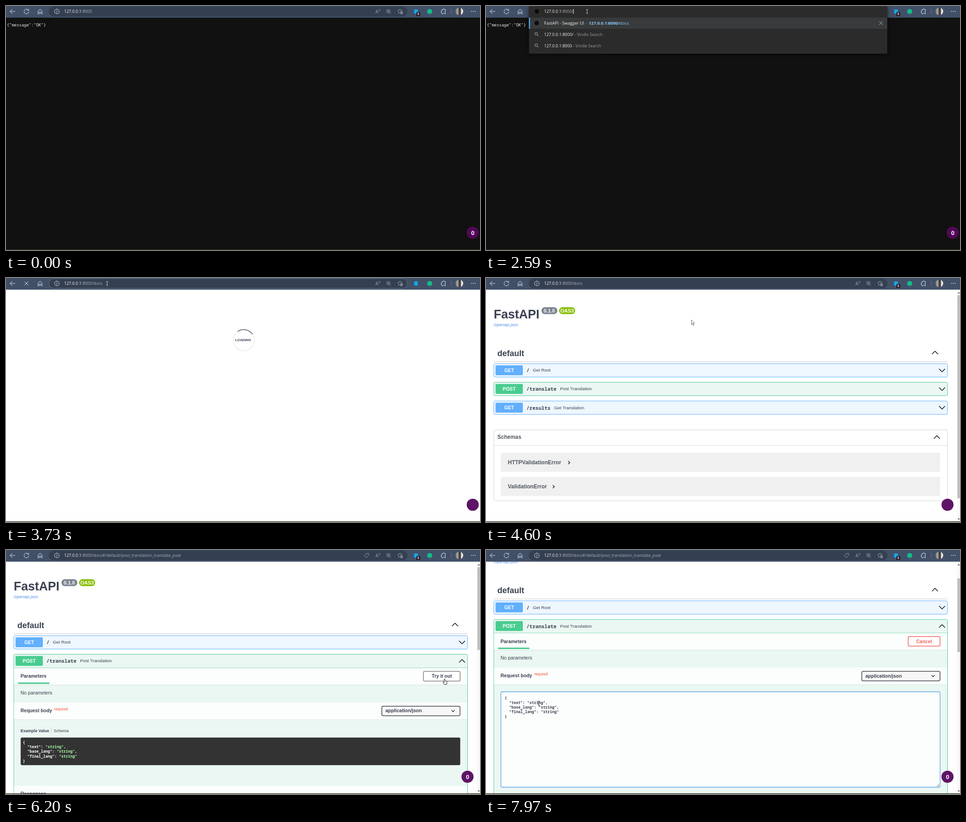
An HTML page that plays this animation: 1043 by 537 pixels, repeating every 8 s.

```html
<!DOCTYPE html>
<html lang="en">
<head>
<meta charset="utf-8">
<title>API docs walkthrough</title>
<style>
html, body { margin: 0; height: 100%; overflow: hidden; background: #111; }
svg { display: block; width: 100vw; height: 100vh; }
text { white-space: pre; }
.ui { font-family: "Open Sans", "Noto Sans", sans-serif; }
.doc { font-family: "Liberation Sans", Arial, sans-serif; }
.code { font-family: "Noto Sans Mono", "DejaVu Sans Mono", monospace; }
.b { font-weight: 700; }
.mid { text-anchor: middle; }
</style>
</head>
<body>
<svg id="stage" viewBox="0 0 1043 537"></svg>
<script>
const LOOP = 8000;
const INK = '#3b4151', GREEN = '#49cc90', BLUE = '#61affe';
const HOST = '127.0.0.1', PORT = ':8000', DOCS = '/docs';

// Moments of the story, in ms
const FOCUS = 1000, DESELECT = 1500, ENTER = 3520, BLANK = 3590, LOADER = 3660, READY = 4000,
  HOVER = 4980, OPEN = 5160, LOADED = 5640, LEAVE = 5780, TRY = 6430, SCROLL = 6800, EDIT = 7550;
const KEYS = [2590, 2860, 3060, 3120, 3320];
const CARET = [188.5, 192.3, 197.8, 203.3, 207.5, 212];

// Pointer path: time, x, y
const TRACK = [
  [170, 872, 508], [420, 660, 440], [650, 286, 236], [830, 190, 34], [920, 190, 12], [1000, 190, 12],
  [1210, 212, 11], [1400, 212, 11], [1700, 222.5, 12], [4330, 222.5, 12], [4700, 540, 130],
  [5090, 833, 246], [5700, 833, 246], [6130, 966, 290], [6450, 966, 290], [6740, 300, 440],
  [6800, 300, 440], [7220, 116.5, 338], [LOOP, 116.5, 338]
];

const rect = (x, y, w, h, fill, r = 0, more = '') =>
  `<rect x="${x}" y="${y}" width="${w}" height="${h}" rx="${r}" fill="${fill}" ${more}/>`;
const box = (x, y, w, h, fill, stroke, width = 1, r = 3) =>
  rect(x, y, w, h, fill, r, `stroke="${stroke}" stroke-width="${width}"`);
const dot = (x, y, r, fill, more = '') => `<circle cx="${x}" cy="${y}" r="${r}" fill="${fill}" ${more}/>`;
const line = (d, stroke, width = 1, more = '') =>
  `<path d="${d}" fill="none" stroke="${stroke}" stroke-width="${width}" ${more}/>`;
const text = (x, y, s, size, fill, cls = 'doc') =>
  `<text x="${x}" y="${y}" font-size="${size}" fill="${fill}" class="${cls}">${s}</text>`;
const span = (s, fill, cls = '') => `<tspan fill="${fill}" class="${cls}">${s}</tspan>`;
const at = (x, y, s, more = '') => `<g transform="translate(${x} ${y}) ${more}">${s}</g>`;
const chevron = (x, y, up) => line(up ? `M${x - 6.5} ${y + 3.5}l6.5-6.5 6.5 6.5` : `M${x - 6.5} ${y - 3}l6.5 6.5 6.5-6.5`, '#111', 1.5);

function pointer(t) {
  const i = TRACK.findIndex(k => k[0] > t);
  if (i < 1) return null;
  const [t0, x0, y0] = TRACK[i - 1], [t1, x1, y1] = TRACK[i];
  const u = (t - t0) / (t1 - t0);
  return { x: x0 + (x1 - x0) * u, y: y0 + (y1 - y0) * u };
}

function drawPointer(t, p) {
  const hand = t >= HOVER && t < LEAVE || t >= 6060 && t < 6500;
  if (hand) return at(p.x, p.y, `<path d="M-2-5.2a1.1 1.1 0 0 1 2.2 0V-1.6L3.6-.9Q4.6-.6 4.6 .6L3.8 5.8H-1.6L-4.6 1.4Q-4.4 .2-3.2 .8L-2 1.8Z" fill="#fff" stroke="#222"/>`);
  if (p.y < 24 || t > 6740)
    return at(p.x, p.y, line('M-2-4.5Q0-4.5 0-3.5Q0-4.5 2-4.5M0-3.5V3.5M-2 4.5Q0 4.5 0 3.5Q0 4.5 2 4.5', t > 6740 ? '#333' : '#d4d4d4'));
  return at(p.x, p.y, '<path d="M-3-6V4L-.8 2 1 6 2.6 5.2.8 1.4H4Z" fill="#fff" stroke="#222" stroke-width=".7"/>');
}

// Browser toolbar

function navIcons(t) {
  const c = '#e6e9ee', busy = t >= ENTER && t < READY;
  return line('M20 12H9.5M14 7l-5 5 5 5', c) +
    (busy ? line('M41 8l8 8M49 8l-8 8', c)
          : line('M49.2 9A5.2 5.2 0 1 0 50.2 12M49.8 6.3V9.4H46.7', c)) +
    line('M70.5 11.2L75 7l4.5 4.2V17H76.7V13.3H73.3V17H70.5Z', c) +
    rect(898, 7.5, 8, 9, '#10a9e8', 1) +
    (busy ? '' : rect(903, 13.5, 8.5, 8.5, '#22162c', 1.5) + text(907.3, 20.3, '0', 7, '#fff', 'doc b mid')) +
    dot(932.3, 12, 5.6, '#14b98c') +
    line('M959 8h2.2a1.7 1.7 0 0 1 3.4 0H967v3a1.7 1.7 0 0 0 0 3.2V17h-2.6a1.7 1.7 0 0 0-3.2 0H959v-2.5a1.7 1.7 0 0 1 0-3.5Z', c) +
    line('M979.5 6V18', '#68758a') +
    dot(997.5, 12, 8.5, 'url(#face)') +
    [1024.5, 1028.5, 1032.5].map(x => dot(x, 12, .9, c)).join('');
}

function pillIcons(t, focused) {
  const c = focused ? '#b9b9b9' : '#98a1ae';
  let s = text(813, 15.8, 'A', 10, c, 'ui') + line('M820 7.5q1 1.7 0 3.2M822 6.3q1.7 2.7 0 5.3', c, .8) +
    dot(841.3, 11.2, 3.7, 'none', `stroke="${c}"`) + line('M844 14l3.2 3.2M839.3 11.2h4M841.3 9.2v4', c, .9) +
    line('M867 6.5l1.5 3.3 3.6.4-2.6 2.4M866.5 15l-2.8 1.5.6-3.5-2.7-2.6 3.7-.5 1.7-3.4', c, .9) +
    dot(870.3, 15, 2.9, c) + line('M868.7 15h3.2M870.3 13.4v3.2', '#333e4d', .8);
  if (focused) s += line('M764.5 14.5V9h7.5M763 15h5.5M769.5 10.8h3.5v4.7h-3.5Z', c) +
    [[788.5, 7.5], [794, 7.5], [788.5, 13], [794, 13]].map(([x, y]) => box(x, y, 3.2, 3.2, 'none', c, 1, 0)).join('') +
    line('M790 12h6M793 9v6', c, .8);
  if (t >= OPEN) s += line('M788 12.7l5-5.2 4.8-.3.2 4.6-5.1 5.2Z', c, .9) + dot(795.6, 9.6, .6, c);
  return s;
}

function dropdown(n) {
  const rows = n < 2 ? 3 : 2, typed = HOST + PORT + DOCS.slice(0, n);
  const search = (y, s) => dot(110.5, y - 4.5, 3, 'none', 'stroke="#bbb"') + line(`M112.8 ${y - 2.2}l3 3`, '#bbb') +
    text(128, y, span(s, '#f0f0f0') + span(' - Vindle Search', '#9a9a9a'), 9, '#fff', 'ui');
  return `<g style="filter:drop-shadow(0 2px 4px #0009)">` +
    rect(94.5, 0, 788.5, rows * 25 + 30, '#2b2b2b', 3) + '</g>' + rect(94.5, 0, 788.5, 5, '#2d2d2d') +
    rect(94.5, 25.5, 788.5, 24.5, '#383a3b') + rect(94.5, 25.5, 2.3, 24.5, '#58aef2') +
    dot(111.5, 37.5, 4.8, '#0a0a0a') + text(128, 41, 'FastAPI - Swagger UI', 9.25, '#f4f4f4', 'ui') +
    text(219, 41, '-', 9, '#9a9a9a', 'ui') +
    text(226, 41, span(typed, '#8ccbff', 'b') + DOCS.slice(n), 9.4, '#8ccbff', 'ui') +
    line('M865 33.5l8 8M873 33.5l-8 8', '#b5b5b5') +
    search(65.7, typed) + (rows > 2 ? search(90.7, HOST + PORT) : '');
}

function toolbar(t, p) {
  const focused = t >= FOCUS && t < ENTER, n = KEYS.filter(k => t >= k).length, list = focused && n;
  const picked = focused && t < DESELECT, over = p && p.y < 24;
  let s = rect(0, 0, 1043, 25.7, '#425067') + navIcons(t);
  if (list) s += dropdown(n);
  else s += (focused ? box(94.8, 1.8, 788, 20.5, '#2a2b2b', '#62b3ee', 1.6, 10.2)
                     : box(94.5, 1.5, 788.5, 21, '#344052', over ? '#5c6a7e' : '#344052', 1, 10.5)) +
    pillIcons(t, focused);
  s += list ? dot(112, 12, 4.8, '#0a0a0a')
            : dot(112, 12, 5.2, 'none', 'stroke="#d5d9df"') + line('M112 11v4M112 8.7v1.2', '#d5d9df', 1.1);
  if (picked) s += rect(127.5, 4.5, 61, 15, '#a6c8f5');
  const tail = t >= OPEN ? DOCS + '#/default/post_translation_translate_post' : DOCS.slice(0, n);
  s += text(128, 15.3, span(HOST, picked ? '#1d2a3a' : '#f3f4f6') + PORT + tail, 9, picked ? '#1d2a3a' : '#a9b0ba', 'ui');
  if (focused && (t >= 1660 && t < 2190 || n)) s += rect(CARET[n] - .4, 6.5, .9, 11, '#fff');
  return s;
}

// Docs page

function row(y, verb, path, name, x, color, fill, height = 29.5) {
  return box(17.2, y, 998.3, height, fill, color, 1) + rect(21, y + 3.7, 60, 21.8, color, 2) +
    text(51, y + 18.3, verb, 10.5, '#fff', 'doc b mid') + text(89, y + 18.8, path, 11, INK, 'code b') +
    text(x, y + 17.8, name, 9.75, INK);
}

function band(y, h, title) {
  return rect(17.7, y, 997.3, h, '#fbfefc') + line(`M17.7 ${y + h}H1015`, '#d3e2db') + text(32, y + 21.3, title, 10.5, INK, 'doc b');
}

function body(x, y, step, ink, value) {
  const pair = (k, comma) => `  "${k}": ` + span('"string"', value) + comma;
  return ['{', pair('text', ','), pair('base_lang', ','), pair('final_lang', ''), '}']
    .map((s, i) => text(x, y + i * step, s, 8.3, ink, 'code b')).join('');
}

function operation(t) {
  let s = band(260, 37, 'Parameters') + rect(26.5, 291.5, 69, 3.2, GREEN) +
    text(32, 317.5, 'No parameters', 10.5, INK) + band(335.5, 38, 'Request body') +
    text(106, 353, 'required', 8.2, '#f5533d') +
    box(827, 343.7, 172, 21, '#f7f7f7', '#41444e', 1.5) + text(835, 357.3, 'application/json', 10.5, INK, 'doc b') +
    line('M980.5 352.5l3.3 3.3 3.3-3.3', '#222', 1.4);
  if (t < TRY) return s + box(918.5, 267, 80.7, 21.5, '#fff', '#808080', 1.5) +
    text(959, 281.3, 'Try it out', 10.5, INK, 'doc b mid') +
    text(32, 401.2, 'Example Value', 9, INK, 'doc b') + line('M99.7 392v12', '#c5cdca') + text(105, 401.2, 'Schema', 9, INK) +
    rect(32.3, 412.7, 967.2, 60.8, '#333', 3) + body(37, 425.5, 10.4, '#fff', '#a2fca2') + band(519, 38, 'Responses');
  const edit = t >= EDIT;
  s += box(929, 267.3, 70, 20.8, '#fff', '#f0605a', 1.5) + text(964, 281.3, 'Cancel', 10.5, '#f0605a', 'doc b mid') +
    box(32.7, 388.7, 966.5, 210, '#fcfefd', edit ? '#5fa4ea' : '#d9d9d9', edit ? 1.3 : 1) +
    body(41, 405, 10.3, INK, INK) + line('M992 597l5-5M995 597l2-2', '#555');
  return edit ? s + rect(115.6, 408, .9, 10.5, '#111') : s;
}

function docs(t) {
  const open = t >= OPEN, full = t >= LOADED, hover = t >= HOVER && t < LEAVE;
  const u = Math.min(1, Math.max(0, (t - SCROLL) / 220)), top = 76.7 * (1 - (1 - u) ** 3);
  const height = t >= TRY ? 1536 : full ? 1368 : open ? 684 : 557;
  let s = text(17, 88.5, 'FastAPI', 27, INK, 'doc b') +
    rect(122, 64.3, 35, 15.2, '#7d8492', 7.6) + text(139.3, 75.8, '0.1.0', 11, '#fff', 'doc b mid') +
    rect(160.8, 64.3, 35.4, 15.2, '#89bf04', 7.6) + text(178.5, 75.8, 'OAS3', 11, '#fff', 'doc b mid') +
    text(17, 106, '/openapi.json', 9, '#4990e2') +
    text(25, 171.5, 'default', 18, INK, 'doc b') + chevron(988, 164, true) + line('M17 184.5H1015.5', '#c4c7cb') +
    row(188.5, 'GET', '/', 'Get Root', 103, BLUE, '#eef6fe') + chevron(1003.5, 203) +
    row(229.5, 'POST', '/translate', 'Post Translation', 163, GREEN, '#ebf7f2', full ? 900 : open ? 156.5 : 29.5) +
    (open ? line('M17.5 259.3H1015', '#8fdcb9') : '') + chevron(hover ? 977.5 : 1003.5, 244, open);
  if (hover) s += rect(989, 234.7, 18.3, 19, '#7d8293', 3) +
    line('M996 239.5h-2v9.5h3M1000 239.5h2.3v2M996 238.5h4v2h-4ZM998 243.5h5v6h-5ZM1004 246.5h-3.5M1001.5 245l-1.5 1.5 1.5 1.5', '#fff', .9);
  if (open && !full) s += box(20.5, 233.5, 965.3, 21.5, 'none', '#161616', 1.6, 2.5) +
    at(516, 307.5, line('M0-8.8A8.8 8.8 0 1 1-8.8 0', '#4c5250', 2.4), `rotate(${(t - 5310) * .36})`);
  if (full) s += operation(t);
  else s += at(0, open ? 0 : -127,
    row(397.7, 'GET', '/results', 'Get Translation', 150, BLUE, '#eef6fe') + chevron(1003.5, 412) +
    box(17.2, 461.3, 998.3, 156, '#fff', '#d3d5d9') + text(25, 480.5, 'Schemas', 12, '#50555f', 'doc b') +
    chevron(992, 477, true) + line('M17 495.5H1015', '#d8dadd') +
    ['HTTPValidationError', 'ValidationError'].map((name, i) => rect(32.3, 511.5 + i * 53, 967, 42, '#f0f0f0', 3) +
      text(48, 536.8 + i * 53, name, 12, '#50555f', 'doc b') +
      line(`M${i ? 147 : 181} ${530 + i * 53}l3.3 3.3-3.3 3.3`, '#222', 1.5)).join(''));
  return at(0, -top, s) + rect(1036.3, 25.7, 6.7, 511, '#f8f8f8') +
    rect(1037.3, 38 + top / height * 488, 5.4, 510 * 488 / height, '#bdbdbd') +
    '<path d="M1037.7 34l2.5-3.5 2.5 3.5ZM1037.7 529l2.5 3.5 2.5-3.5Z" fill="#666"/>';
}

function page(t) {
  if (t < BLANK) return text(2, 44.7, '{"message":"OK"}', 8.95, '#f2f2f2', 'code');
  let s = rect(0, 25, 1043, 512, '#fff');
  if (t >= READY) return s + docs(t);
  if (t >= LOADER) s += dot(523, 137, 23.3, 'none', 'stroke="#ebebee" stroke-width="1.5"') +
    at(523, 137, line('M-16.5-16.5A23.3 23.3 0 0 1 16.5-16.5', '#5d5568', 1.5), `rotate(${11 + (t - 3730) * .36})`) +
    text(504.5, 138.6, 'LOADING', 7.5, '#46365c', 'doc b');
  return s;
}

function badge(t) {
  const x = t < READY ? 1027 : 1015.5, count = t < BLANK || t >= LOADED;
  return dot(x, 499, 13.3, t < BLANK ? '#520657' : '#5f1466') +
    (count ? text(x, 503.7, '0', 13, '#fff', 'doc b mid') : '');
}

const defs = `<defs><linearGradient id="face">
  <stop stop-color="#777"/><stop offset=".3" stop-color="#aaa"/><stop offset=".5" stop-color="#333"/>
  <stop offset=".68" stop-color="#555"/><stop offset=".75" stop-color="#ddd"/><stop offset="1" stop-color="#eee"/>
</linearGradient></defs>`;
const stage = document.getElementById('stage');

function draw(now) {
  const t = now % LOOP, p = pointer(t);
  stage.innerHTML = defs + rect(0, 0, 1043, 537, '#111') + page(t) + badge(t) +
    rect(0, 535.7, 1043, 1.3, t < BLANK ? '#3a2d20' : '#252b10') + toolbar(t, p) + (p ? drawPointer(t, p) : '');
}

const start = performance.now();
function tick() {
  draw(performance.now() - start);
  requestAnimationFrame(tick);
}
tick();
</script>
</body>
</html>
```
